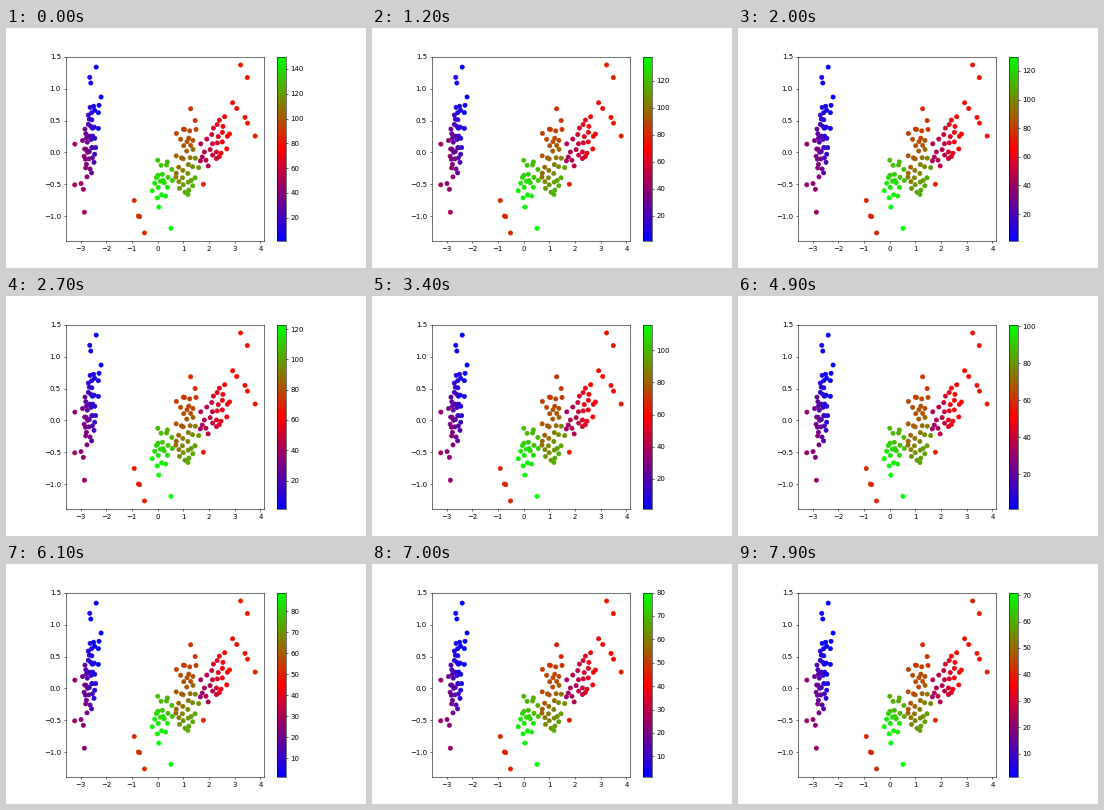
A matplotlib script for the animation above (8000 ms loop, 360 px wide and 240 px high).

```python
import numpy as np
import matplotlib.pyplot as plt
from matplotlib.animation import FuncAnimation

FRAMES = 80
W, H = 360, 240
GOLDEN = np.pi * (3 - 5 ** 0.5)

rng = np.random.default_rng(7)


def blob(count, center, radii, tilt):
    """Evenly filled, slightly shaken ellipse, tilted by degrees."""
    i = np.arange(count)
    r, a = np.sqrt((i + 0.5) / count), i * GOLDEN
    p = np.column_stack([r * np.cos(a), r * np.sin(a)]) * radii
    c, s = np.cos(np.radians(tilt)), np.sin(np.radians(tilt))
    return p @ np.array([[c, s], [-s, c]]) + center + rng.normal(0, 0.035, (count, 2))


def ranked(points, direction):
    """Points sorted along a direction, which sets their label order."""
    points = np.asarray(points)
    return points[np.argsort(points @ direction)]


left = np.vstack([
    blob(40, (-2.62, 0.2), (0.29, 0.62), -11),
    [(-2.64, 1.18), (-2.39, 1.34), (-2.60, 1.09), (-2.20, 0.87), (-2.28, 0.74),
     (-2.85, -0.94), (-2.89, -0.58), (-2.98, -0.49), (-3.224, -0.51), (-3.22, 0.13)],
])
right = np.vstack([
    blob(26, (2.25, 0.13), (0.66, 0.31), 19),
    [(2.61, 0.56), (2.92, 0.78), (3.08, 0.69), (3.40, 0.55), (3.50, 0.46),
     (3.795, 0.257), (3.49, 1.176), (3.23, 1.374)],
])
stray = [(1.78, -0.50), (-0.51, -1.266), (-0.70, -1.01), (-0.75, -1.0), (-0.91, -0.756)]
upper = np.vstack([blob(11, (1.12, 0.27), (0.42, 0.2), 5), [(1.285, 0.685), (1.46, 0.50)]])
core = blob(26, (1.12, -0.32), (0.5, 0.4), 0)
lower = np.vstack([blob(21, (0.19, -0.42), (0.48, 0.32), 30), [(0.52, -1.193)]])

points = np.vstack([
    ranked(left, (-1, -0.35)),
    ranked(right, (1, 0.3)),
    ranked(stray, (-1, 0)),
    ranked(upper, (0, -1)),
    ranked(core, (0.6, -1)),
    ranked(lower, (-0.3, -1)),
])
total = len(points)

# Neighbours in label order merge one per frame, a little faster on the left.
keys = rng.random(total)
keys[:len(left)] /= 1.2
keys[0] = np.inf
merge_order = np.argsort(keys)


def labels(merges):
    starts = np.ones(total, int)
    starts[merge_order[:merges]] = 0
    return np.cumsum(starts)


def box(x, width):
    """Axes box in pixels, a quarter pixel up and left for crisp edges."""
    return [(x - 0.25) / W, 0.11 + 0.25 / H, width / W, 0.77]


fig = plt.figure(figsize=(W / 50, H / 50), dpi=50, facecolor="white")
ax = fig.add_axes(box(60, 198.4))
dots = ax.scatter(*points.T, c=labels(0), cmap="brg")
fig.colorbar(dots, cax=fig.add_axes(box(270.8, 9.24)))


def update(i):
    dots.set_array(labels(i))
    dots.set_clim(1, total - i)
    return [dots]


anim = FuncAnimation(fig, update, frames=FRAMES, interval=100, repeat=True,
                     repeat_delay=0, blit=False)
plt.show()
```
